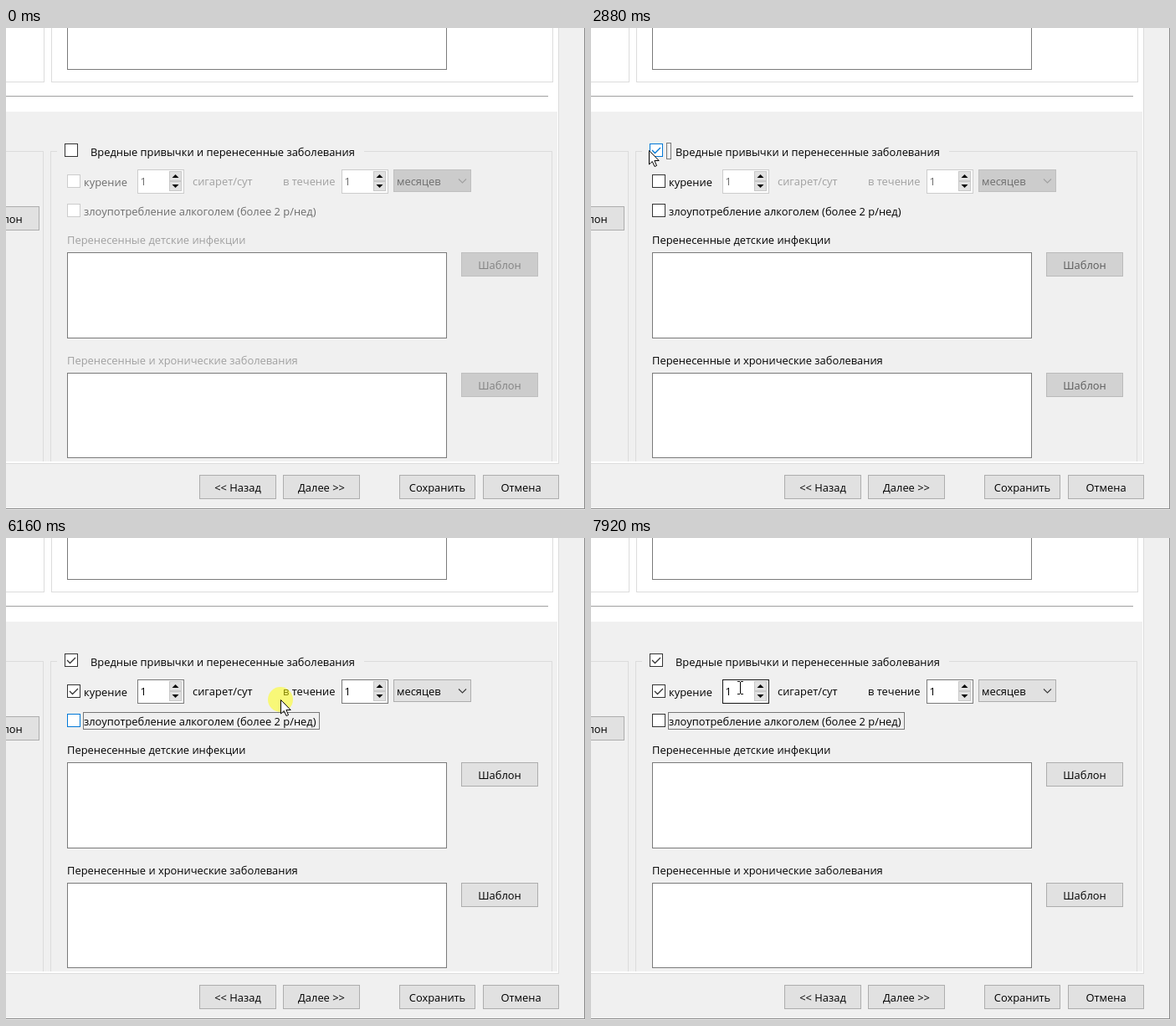
An HTML page with a canvas that plays this animation: 692x576 px, repeating every 8 s.

```html
<!DOCTYPE html>
<html lang="ru">
<head>
<meta charset="utf-8">
<style>
html, body { margin: 0; width: 100%; height: 100%; overflow: hidden; background: #f0f0f0; }
canvas { display: block; }
</style>
</head>
<body>
<canvas id="stage" width="692" height="576"></canvas>
<script>
const ctx = document.getElementById('stage').getContext('2d');
const W = 692, H = 576, LOOP = 8000, STEP = 40, LAG = 160;
const FONT = '12.9px "Open Sans", "Noto Sans", sans-serif';
const SOFT = '#dcdcdc', FIELD = '#7a7a7a', BORDER = '#8a8a8a', BLUE = '#0078d7';

// Mouse button: when it goes down and up
const press = {
  window: { down: 1000, up: 1160 },
  habits: { down: 2640, up: 2800 },
  smoking: { down: 5000, up: 5160 },
  alcohol: { down: 5880, up: 7520 }
};

// Pointer moves: start, duration, destination
const entry = [330, 580];
const moves = [
  [440, 560, 272, 208],
  [1360, 280, 90, 133],
  [1640, 80, 82, 140],
  [1880, 480, 75, 140],
  [2800, 80, 69, 146],
  [3440, 840, 82, 181],
  [5200, 320, 84, 206],
  [5800, 80, 86, 212],
  [5880, 280, 328, 193],
  [6160, 400, 210, 181],
  [6640, 80, 208, 177],
  [6720, 480, 168, 178],
  [7200, 240, 178, 179]
];

const clamp = v => Math.max(0, Math.min(1, v));
const ramp = (t, start, len) => clamp((t - start) / len);
const smooth = k => k * k * (3 - 2 * k);
const fade = (a, b, k) => {
  const v = Math.round(a + (b - a) * k);
  return `rgb(${v},${v},${v})`;
};

function pointer(t) {
  let [x, y] = entry;
  for (const [start, len, toX, toY] of moves) {
    const k = smooth(ramp(t, start, len));
    x += (toX - x) * k;
    y += (toY - y) * k;
  }
  return [Math.round(x), Math.round(y)];
}

function fill(x, y, w, h, color) {
  ctx.fillStyle = color;
  ctx.fillRect(x, y, w, h);
}

function outline(x, y, w, h, color) {
  ctx.strokeStyle = color;
  ctx.lineWidth = 1;
  ctx.strokeRect(x + .5, y + .5, w - 1, h - 1);
}

function box(x, y, w, h, face, edge) {
  fill(x, y, w, h, face);
  outline(x, y, w, h, edge);
}

function text(s, x, y, color, align = 'left') {
  ctx.fillStyle = color;
  ctx.textAlign = align;
  ctx.fillText(s, x, y);
}

function trace(points) {
  ctx.beginPath();
  points.forEach(([x, y]) => ctx.lineTo(x, y));
}

function line(points, color, width) {
  ctx.strokeStyle = color;
  ctx.lineWidth = width;
  trace(points);
  ctx.stroke();
}

function poly(points, color) {
  ctx.fillStyle = color;
  trace(points);
  ctx.fill();
}

function chevron(x, y, r, color) {
  line([[x - r, y], [x, y + r], [x + r, y]], color, 1.1);
}

function button(s, x, y, w, on = 1) {
  box(x, y, w, 29, fade(204, 225, on), fade(191, 173, on));
  text(s, x + w / 2, y + 20, fade(131, 0, on), 'center');
}

function check(x, y, on, ticked, seen, down) {
  const hover = on && Math.abs(seen[0] - x - 8) <= 12 && Math.abs(seen[1] - y - 8) <= 12;
  const edge = hover ? BLUE : on ? '#333' : '#ccc';
  box(x, y, 16, 16, hover && down ? '#cce4f7' : '#fff', edge);
  if (ticked) line([[x + 3, y + 8], [x + 6.5, y + 11.5], [x + 13, y + 5]], edge, 1.3);
}

function spin(x, on, edge) {
  box(x, 169, 56, 29, '#fff', edge);
  text('1', x + 3.5, 188, fade(109, 0, on));
  for (const dir of [-1, 1]) {
    const cx = x + 45.5, cy = 183 + 6 * dir;
    box(x + 38, cy - 6, 15, 12, '#e1e1e1', '#c8c8c8');
    poly([[cx - 4, cy - 2 * dir], [cx + 4, cy - 2 * dir], [cx, cy + 2 * dir]], '#000');
  }
}

function focus(x, y, w, h) {
  ctx.setLineDash([1, 1]);
  outline(x, y, w, h, '#000');
  ctx.setLineDash([]);
}

function panel() {
  fill(0, 0, W, H, '#f0f0f0');
  fill(0, 0, 660, 100, '#fff');
  outline(-9, -9, 55, 74, SOFT);
  outline(54, -9, 600, 74, SOFT);
  outline(73, -9, 454, 59, FIELD);
  fill(0, 81, 648, 1, '#a0a0a0');

  outline(-9, 147, 54, H, SOFT);
  outline(53, 147, 600, H, SOFT);
  fill(61, 147, 367, 1, '#f0f0f0');

  fill(0, 518, W, H, '#f0f0f0');
  fill(0, 518, 660, 2, '#fff');
  fill(659, 0, 1, 520, '#fff');
  outline(-9, -9, 670, 530, SOFT);
  outline(-9, -9, W + 9, H + 8, BORDER);
}

function arrow(x, y) {
  const shape = [[0, 0], [0, 16.5], [3.8, 13], [6.5, 19], [9, 18], [6.4, 12], [11.7, 12], [0, 0]];
  const pts = shape.map(([dx, dy]) => [x + dx + .5, y + dy + .5]);
  poly(pts, '#fff');
  line(pts, '#000', 1);
}

function beam(x, y) {
  fill(x, y - 7, 1, 14, '#000');
  for (const dy of [-8, 7]) {
    fill(x - 3, y + dy, 3, 1, '#000');
    fill(x + 1, y + dy, 3, 1, '#000');
  }
}

function glow(x, y) {
  ctx.fillStyle = 'rgba(255,255,0,.5)';
  ctx.beginPath();
  ctx.arc(x, y, 15, 0, Math.PI * 2);
  ctx.fill();
}

function draw(t) {
  const { window: win, habits, smoking, alcohol } = press;
  const held = Object.values(press).find(p => t >= p.down && t < p.up);
  const seen = pointer(held ? held.down : t - LAG);
  const down = held && t > held.down && t < held.down + LAG;
  const main = t >= habits.up, smokes = t >= smoking.up, typing = t > alcohol.up;
  const templates = ramp(t, habits.up - 40, 400);
  const details = ramp(t, smoking.up, 240);
  const label = main ? '#000' : '#a0a0a0';
  const option = main ? '#000' : '#6d6d6d';
  const unit = smokes ? '#000' : '#a0a0a0';
  const spinEdge = fade(204, 122, details);

  ctx.font = FONT;
  panel();

  button('Шаблон', -52, 213, 92);
  button('<< Назад', 231, 534, 92);
  button('Далее >>', 331, 534, 92);
  button('Сохранить', 470, 534, 91);
  button('Отмена', 570, 534, 91);

  check(70, 138, true, main, seen, down);
  text('Вредные привычки и перенесенные заболевания', 101, 153, '#000');
  check(73, 175, main, smokes, seen, down);
  text('курение', 93, 189, option);
  check(73, 210, main, false, seen, down);
  text('злоупотребление алкоголем (более 2 р/нед)', 93, 224, option);

  if (t >= alcohol.down) focus(92, 208, 283, 21);
  else if (smokes) focus(92, 174, 55, 20);
  else if (t >= win.down) focus(90, 137, 6, 20);

  spin(157, details, typing ? '#171717' : spinEdge);
  text('сигарет/сут', 223, 188, unit);
  text('в течение', 331, 188, unit);
  spin(401, details, spinEdge);
  box(463, 169, 93, 27, fade(204, 225, details), fade(191, 173, details));
  text('месяцев', 467, 188, fade(109, 0, details));
  chevron(545.5, 180.5, 4.5, fade(160, 60, details));

  ['Перенесенные детские инфекции', 'Перенесенные и хронические заболевания'].forEach((s, i) => {
    const y = 268 + 144 * i;
    text(s, 73, y - 10, label);
    box(73, y, 454, 103 - i, '#fff', FIELD);
    button('Шаблон', 544, y, 92, templates);
  });

  const [x, y] = pointer(t);
  if (held) glow(x, y);
  if (typing) beam(x, y);
  else arrow(x, y);
}

const begin = performance.now();
function tick() {
  const t = (performance.now() - begin) % LOOP;
  draw(Math.floor(t / STEP) * STEP);
  requestAnimationFrame(tick);
}
tick();
</script>
</body>
</html>
```
